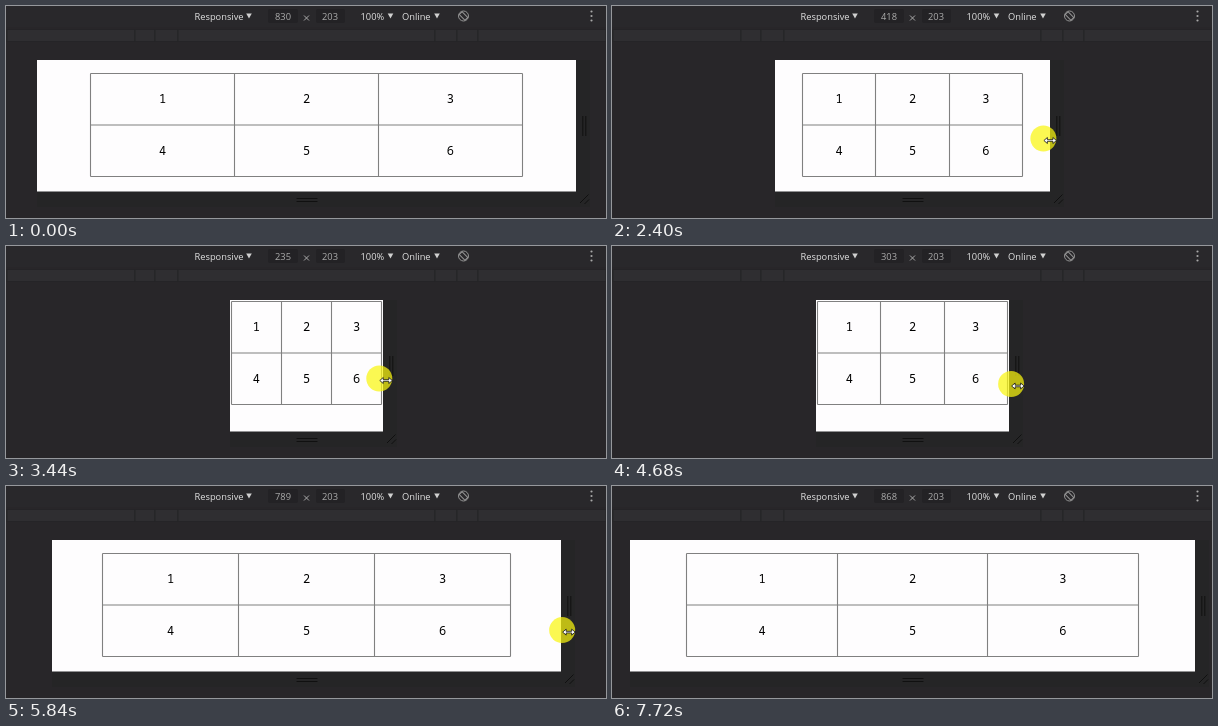
An HTML page that plays this animation: 600 px wide and 212 px high, repeating every 8.08 s.

```html
<!DOCTYPE html>
<html lang="en">
<head>
<meta charset="utf-8">
<title>Responsive grid</title>
<style>
html, body { margin: 0; width: 100%; height: 100%; overflow: hidden; background: #282629; }
svg { display: block; width: 100vw; height: 100vh; }
text { font: 9.3px "Open Sans", "Noto Sans", sans-serif; fill: #e2e2e2; }
.num { fill: #adadad; text-anchor: middle; }
#cells text { font: 500 12px "Noto Sans Mono", monospace; fill: #000; text-anchor: middle; }
.grip { stroke: #101010; fill: none; }
</style>
</head>
<body>
<svg viewBox="0 0 600 212">
  <rect width="600" height="21" fill="#29282b"/>
  <g fill="#232225">
    <rect x="262" y="3" width="30" height="14" rx="2"/>
    <rect x="310" y="3" width="29" height="14" rx="2"/>
  </g>
  <g id="bars" fill="#2f2e31" stroke="#252427"></g>
  <g id="menus"></g>
  <text id="size" class="num" x="277" y="13.5"></text>
  <path d="M298 9.500l5 5m0-5l-5 5" stroke="#aaa"/>
  <text class="num" x="324" y="13.5">203</text>
  <g stroke="#929292" fill="none">
    <circle cx="457.500" cy="10" r="5"/>
    <rect x="455.500" y="6" width="4" height="8" transform="rotate(-45 457.500 10)"/>
  </g>
  <path d="M585.500 5.500v9.500" stroke="#a8a8a8" stroke-width="2.200" stroke-linecap="round" stroke-dasharray="0 4.500"/>
  <rect id="frame" y="54" height="147" fill="#252526"/>
  <rect id="page" y="54" height="131.500" fill="#fefdfe"/>
  <path class="grip" d="M290.500 192.500h21m-21 3h21"/>
  <path id="grips" class="grip" d="M6.800 110v20m3-20v20M4 197l8.500-8.500M8.500 198l4.500-4.500"/>
  <g id="cells">
    <path id="lines" fill="none" stroke="#808080" stroke-width="1.100"/>
  </g>
  <g id="ring" fill="none" stroke="#94953a" stroke-width="1.600">
    <circle id="outer" cx="574" cy="133.500"/>
    <circle cx="574" cy="133.500" r="2.200"/>
  </g>
  <g id="mouse">
    <circle cx="-6.500" cy="-2" r="13" fill="#faf50f" fill-opacity=".72"/>
    <path id="shape" fill="#fff" stroke="#111" stroke-width=".8" stroke-linejoin="round"/>
  </g>
</svg>
<script>
const LOOP = 8080, STEP = 40, MID = 300.5, SCALE = .65;
const NS = "http://www.w3.org/2000/svg";
const RESIZE = "M-6 0l3.500-3v2.200h5.500v-2.200l3.500 3l-3.500 3v-2.200h-5.500v2.200z";
const ARROW = "M0 0v11l2.500-2.300l2 4l1.700-.8l-1.900-3.900h3.500z";

// Half of the page width at a few moments of the drag
const HALF = [[1160, 269.75], [1520, 243], [1880, 189.5], [2400, 137.5], [2720, 106],
  [3440, 76.8], [3800, 72], [4380, 72], [5200, 182], [5360, 198.6], [6040, 273.5], [6480, 282.1]];

const $ = id => document.getElementById(id);
const clamp = x => Math.max(0, Math.min(1, x));
const part = (t, a, b) => clamp((t - a) / (b - a));
const snap = x => Math.floor(x) + .5;
const show = (el, on) => set(el, { visibility: on ? "visible" : "hidden" });

function set(el, attrs) {
  for (const k in attrs) el.setAttribute(k, attrs[k]);
}

function add(parent, tag, attrs, text = "") {
  const el = document.createElementNS(NS, tag);
  set(el, attrs);
  el.textContent = text;
  return $(parent).appendChild(el);
}

// Smooth curve through the keys, level at turning points and ends
function slope(i) {
  if (i === 0 || i === HALF.length - 1) return 0;
  const [[t0, a], [, b], [t1, c]] = HALF.slice(i - 1, i + 2);
  return (b - a) * (c - b) <= 0 ? 0 : (c - a) / (t1 - t0);
}

function half(t) {
  const i = HALF.findIndex(k => k[0] > t);
  if (i < 0) return HALF[HALF.length - 1][1];
  if (i === 0) return HALF[0][1];
  const [t0, a] = HALF[i - 1], [t1, b] = HALF[i];
  const d = t1 - t0, u = (t - t0) / d, v = 1 - u;
  return a + (b - a) * u * u * (3 - 2 * u) + d * u * v * (slope(i - 1) * v - slope(i) * u);
}

const stops = [1, 129, 149, 172, 429, 451, 472, 600];
stops.slice(1).forEach((x, i) =>
  add("bars", "rect", { x: stops[i], y: 23.5, width: x - stops[i], height: 12 }));
for (const [label, x, tip] of [["Responsive", 188.5, 243], ["100%", 354.5, 384.5], ["Online", 396, 431]]) {
  add("menus", "text", { x, y: 13.5 }, label);
  add("menus", "path", { d: `M${tip - 2.8} 7.5h5.6l-2.8 5z`, fill: "#d0d0d0" });
}
const digits = [1, 2, 3, 4, 5, 6].map(n => add("cells", "text", {}, n));

function drawPage(t) {
  const h = half(t), left = Math.round(MID - h), right = Math.round(MID + h);
  set($("frame"), { x: left, width: right - left + 14 });
  set($("page"), { x: left, width: right - left });
  set($("grips"), { transform: `translate(${right})` });
  $("size").textContent = Math.round(2 * half(t + 15) / SCALE);

  const narrow = 2 * h / SCALE <= 400;
  const top = narrow ? 55.5 : 67.5, row = 51.5;
  const w = narrow ? 2 * h - 3.5 : 1.6 * h;
  const x = MID - w / 2, col = w / 3;
  let d = "";
  for (let i = 0; i < 4; i++) d += `M${snap(x + i * col)} ${top}v${2 * row}`;
  for (let i = 0; i < 3; i++) d += `M${snap(x)} ${top + i * row}H${snap(x + w)}`;
  set($("lines"), { d });
  digits.forEach((el, i) => set(el, {
    x: x + (i % 3 + .5) * col,
    y: top + 29.5 + (i > 2 ? row + .5 : 0)
  }));
}

function drawMouse(t) {
  const away = 1 - part(t, 400, 880), leave = part(t, 6760, 7280);
  const x = MID + half(t + 35) + 3.5 - 21 * away + 18 * leave;
  const y = 134.5 + 90 * away ** 2 + 15 * part(t, 3640, 6480) + 38 * leave;
  set($("mouse"), { transform: `translate(${x} ${y})` });
  show($("mouse"), t >= 400 && t < 7320);
  set($("shape"), { d: t >= 840 && t < 6800 ? RESIZE : ARROW });

  const p = part(t, 1280, 1620);
  set($("outer"), { r: 2.5 + 12.7 * p });
  show($("ring"), p > 0 && p < 1);
}

const start = performance.now();
function tick() {
  const t = Math.floor((performance.now() - start) % LOOP / STEP) * STEP;
  drawPage(t);
  drawMouse(t);
  requestAnimationFrame(tick);
}
tick();
</script>
</body>
</html>
```
